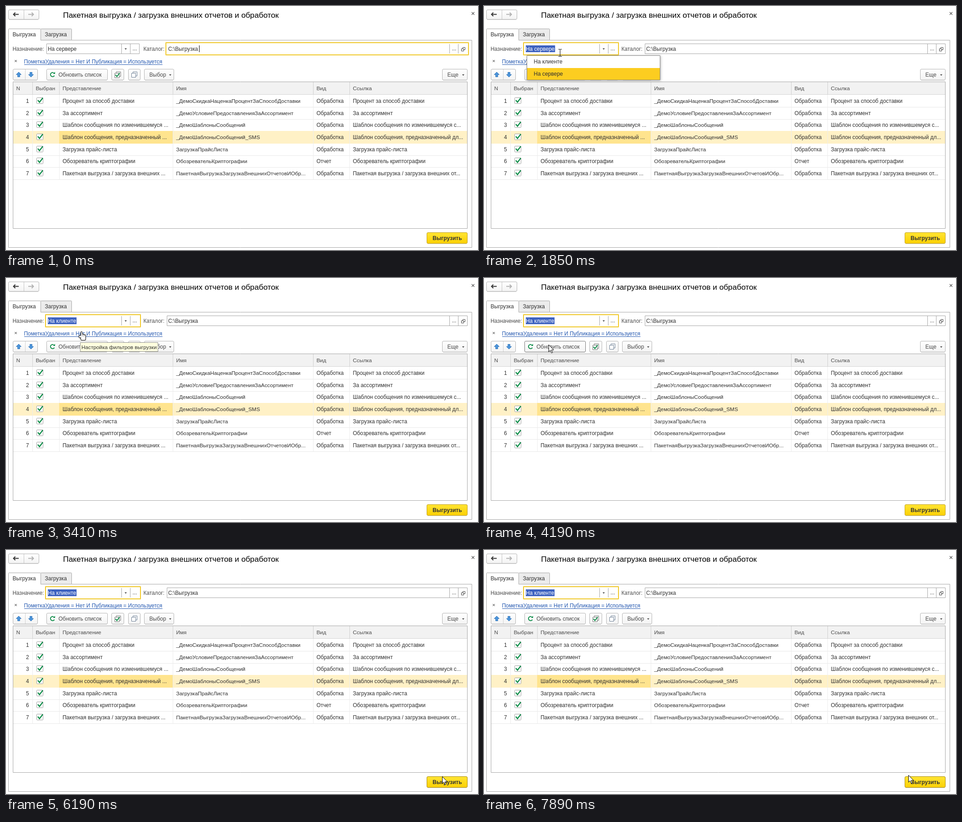
An HTML page with a canvas for the animation above (8 s loop, 1039 px wide and 539 px high).

```html
<!DOCTYPE html>
<html lang="ru">
<head>
<meta charset="utf-8">
<style>
html, body { margin: 0; width: 100%; height: 100%; overflow: hidden; background: #fff; }
canvas { display: block; }
</style>
</head>
<body>
<canvas id="stage" width="1039" height="539"></canvas>
<script>
const c = document.getElementById('stage').getContext('2d');
const LOOP = 8000;
const FONT = '"Liberation Sans", Arial, sans-serif';
const GOLD = '#f0c828', EDGE = '#a6a6a6', INK = '#303030', GRAY = '#4a4a4a', GREEN = '#0d8c48';
const HEAD = 167, BODY = 196, PITCH = 26.67;

const COLUMNS = [['N', 23], ['Выбран', 66], ['Представление', 125], ['Имя', 375], ['Вид', 684], ['Ссылка', 764]];
const ROWS = [
  ['Процент за способ доставки', '_ДемоСкидкаНаценкаПроцентЗаСпособДоставки'],
  ['За ассортимент', '_ДемоУсловиеПредоставленияЗаАссортимент'],
  ['Шаблон сообщения по изменившемуся ...', '_ДемоШаблоныСообщений', 'Шаблон сообщения по изменившемуся с...'],
  ['Шаблон сообщения, предназначенный ...', '_ДемоШаблоныСообщений_SMS', 'Шаблон сообщения, предназначенный дл...'],
  ['Загрузка прайс-листа', 'ЗагрузкаПрайсЛиста'],
  ['Обозреватель криптографии', 'ОбозревательКриптографии'],
  ['Пакетная выгрузка / загрузка внешних ...', 'ПакетнаяВыгрузкаЗагрузкаВнешнихОтчетовИОбр...', 'Пакетная выгрузка / загрузка внешних от...']
];

const TRIPS = [
  { start: 690, end: 1460, steps: 11, to: [163, 109], ease: [3.85, 2.02] },
  { start: 1540, end: 1930, steps: 6, to: [167, 103] },
  { start: 2230, end: 2400, steps: 3, to: [164, 117] },
  { start: 3640, end: 3870, steps: 4, to: [143, 146] },
  { start: 4190, end: 4490, steps: 5, to: [141, 150] },
  { start: 5580, end: 6040, steps: 7, to: [931, 503] },
  { start: 6190, end: 6190, steps: 1, to: [960, 500] },
  { start: 6270, end: 6970, steps: 10, to: [1013, 484], bulge: [-756, -313] },
  { start: 7050, end: 7130, steps: 2, to: [1000, 503] },
  { start: 7280, end: 7890, steps: 9, to: [934, 497] }
];
TRIPS.forEach((trip, i) => trip.from = i ? TRIPS[i - 1].to : [1182, 606]);

function text(s, x, y, size = 11.85, color = INK, weight = '', align = 'left') {
  c.font = `${weight} ${size}px ${FONT}`;
  c.fillStyle = color;
  c.textAlign = align;
  c.fillText(s, x - .5, y);
}

function rect(x, y, w, h, color) {
  c.fillStyle = color;
  c.fillRect(x, y, w, h);
}

function box(x, y, w, h, fill, stroke, r = 0) {
  c.beginPath();
  c.roundRect(x + .5, y + .5, w - 1, h - 1, r);
  c.fillStyle = fill;
  c.fill();
  c.strokeStyle = stroke;
  c.lineWidth = 1;
  c.stroke();
}

function line(points, color, width = 1) {
  c.beginPath();
  points.forEach(p => c.lineTo(...p));
  c.strokeStyle = color;
  c.lineWidth = width;
  c.stroke();
}

function shape(points, fill, stroke) {
  c.beginPath();
  points.forEach(p => c.lineTo(...p));
  c.closePath();
  c.fillStyle = fill;
  c.fill();
  if (stroke) {
    c.strokeStyle = stroke;
    c.lineWidth = 1;
    c.stroke();
  }
}

function at(x, y, paint, turn = 0) {
  c.save();
  c.translate(x, y);
  c.rotate(turn);
  paint();
  c.restore();
}

function button(x, y, w, h, edge = '#b3b3b3', top = '#fff', bottom = '#f3f3f3') {
  const g = c.createLinearGradient(0, y, 0, y + h);
  g.addColorStop(0, top);
  g.addColorStop(1, bottom);
  rect(x + 2, y + h, w - 4, 1, '#e2e2e2');
  box(x, y, w, h, g, edge, 2.5);
}

function input(x, w, focused) {
  if (focused) {
    box(x - 3, 80, w + 6, 29, '#fff', GOLD);
    box(x - 2, 81, w + 4, 27, '#fff', GOLD);
  } else {
    box(x, 83, w, 23, '#fff', EDGE);
  }
  for (const dx of [39, 20]) rect(x + w - dx - 1, 84, 1, 21, EDGE);
}

const triangle = (x, y) => shape([[x - 2.5, y - 1.5], [x + 2.5, y - 1.5], [x, y + 1.5]], '#444');

function cross(x, y, r, color) {
  for (const d of [-r, r]) line([[x - r, y - d], [x + r, y + d]], color, 1.1);
}

function navArrow(x, color, turn) {
  at(x, 18.5, () => {
    line([[-5, 0], [6, 0]], color, 2);
    line([[-1.5, -4], [-5.5, 0], [-1.5, 4]], color, 2);
  }, turn);
}

function blueArrow(x, turn) {
  at(x, 151.5, () => shape([[0, -5.5], [5.5, 0], [2.3, 0], [2.3, 5], [-2.3, 5], [-2.3, 0], [-5.5, 0]],
    '#4d96dc', '#2f73b8'), turn);
}

function check(x, y, s = 1) {
  line([[x, y], [x + 3.7 * s, y + 4.5 * s], [x + 11 * s, y - 5 * s]], GREEN, 2.4 * s);
}

function sheets(x, y, size, edge) {
  box(x + 3, y, size, size, '#fff', edge);
  box(x, y + 3, size, size, '#fff', edge);
}

function drawWindow() {
  rect(0, 0, 1039, 539, '#fff');
  button(5, 8, 68, 22);
  rect(39, 9, 1, 20, '#c4c4c4');
  navArrow(22, '#333', 0);
  navArrow(55, '#b0b0b0', Math.PI);
  text('Пакетная выгрузка / загрузка внешних отчетов и обработок', 126, 26, 17.23, '#000');
  cross(1028, 16.5, 3, '#555');

  box(5, 75, 1021, 459, '#fff', EDGE);
  box(76, 50, 69, 26, '#ececec', EDGE, 1);
  box(5, 50, 72, 26, '#fff', EDGE, 1);
  rect(6, 74, 70, 3, '#fff');
  text('Выгрузка', 15, 66.5, 12);
  text('Загрузка', 86, 66.5, 12);
}

function drawFields(value, moved, selected) {
  text('Назначение:', 15, 99, 11.85, GRAY);
  input(89, 205, moved);
  triangle(263.5, 95);
  text('...', 279, 98);
  if (selected) rect(92, 87, c.measureText(value).width + 1, 15, '#3d62c0');
  text(value, 92.5, 99, 11.85, selected ? '#fff' : INK);

  text('Каталог:', 303, 99, 11.85, GRAY);
  input(354, 662, !moved);
  text('C:\\Выгрузка', 357.5, 99);
  if (!moved) rect(425, 87, 1, 15, '#000');
  text('...', 982, 98);
  sheets(1002, 91, 6, '#444');

  const link = 'ПометкаУдаления = Нет И Публикация = Используется';
  cross(21.5, 121.5, 2.2, '#666');
  text(link, 40, 127, 11.88, '#2458b0');
  rect(40, 129, c.measureText(link).width, 1, '#2458b0');
}

function drawToolbar(hot) {
  button(15, 139, 55, 25);
  rect(42, 140, 1, 23, '#d0d0d0');
  blueArrow(28, 0);
  blueArrow(55, Math.PI);

  button(89, 139, 135, 25, hot ? '#777' : undefined);
  c.beginPath();
  c.arc(102.5, 151.5, 4.5, .5, 5.3);
  c.strokeStyle = GREEN;
  c.lineWidth = 2;
  c.stroke();
  shape([[103.5, 150], [108, 150], [108, 145.5]], GREEN);
  text('Обновить список', 116, 156, 12, GRAY);

  button(232, 139, 28, 25);
  sheets(239, 145, 11, '#777');
  check(241, 152, .85);
  button(269, 139, 27, 25);
  sheets(276, 145, 10, '#6d7f95');
  button(304, 139, 66, 25);
  text('Выбор', 316, 156, 12, GRAY);
  triangle(361.5, 152.5);
  button(960, 139, 56, 25);
  text('Еще', 972, 156, 12, GRAY);
  triangle(1006.5, 152.5);
}

function drawTable() {
  const rowTop = i => Math.floor(BODY + .8 + i * PITCH);
  box(15, HEAD, 1001, 325, '#fff', EDGE);
  rect(16, HEAD + 1, 999, 28, '#f2f2f2');
  rect(16, BODY - 1, 999, 1, '#d4d4d4');
  ROWS.forEach((_, i) => rect(16, rowTop(i + 1), 999, 1, '#e8e8e8'));
  rect(16, rowTop(3), 999, 28, '#fff1c6');
  COLUMNS.forEach(([name, x], i) => {
    text(name, x, 185.5, 11.8, GRAY);
    if (!i) return;
    rect(x - 8, HEAD + 1, 1, 28, '#d0d0d0');
    rect(x - 8, BODY, 1, 187, '#ececec');
  });
  rect(117, rowTop(3), 250, 28, '#ffe48e');

  const [, , titleX, nameX, kindX, refX] = COLUMNS.map(col => col[1]);
  ROWS.forEach(([title, name, ref = title], i) => {
    const y = Math.round(214 + i * PITCH);
    text(i + 1, 51, y, 11.85, INK, '', 'right');
    box(67, y - 12, 15, 14, '#fff', '#a0a0a0', 1);
    check(70, y - 6);
    text(title, titleX, y, 11.98);
    text(name, nameX, y, 11.82);
    text(i === 5 ? 'Отчет' : 'Обработка', kindX, y);
    text(ref, refX, y, 11.95);
  });
}

function drawSubmit(hot, pressed) {
  const [top, bottom] = pressed ? ['#f0c800', '#e8c000'] : ['#ffe535', '#fbd000'];
  button(926, 500, 90, 25, hot ? '#a88a10' : '#c0a020', top, bottom);
  text('Выгрузить', 939.5, 517, 12.1, '#333', 'bold');
}

function drawMenu(active) {
  c.save();
  c.shadowColor = 'rgba(0,0,0,.3)';
  c.shadowBlur = 5;
  c.shadowOffsetX = c.shadowOffsetY = 1;
  rect(94, 109, 294, 55, '#fff');
  c.restore();
  box(94, 109, 294, 55, '#fff', '#858585');
  ['На клиенте', 'На сервере'].forEach((item, i) => {
    if (i === active) rect(95, 110 + 27 * i, 292, 26, '#fccd20');
    text(item, 110, 127 + 27 * i, 12);
  });
}

function drawTip() {
  box(163, 142, 172, 21, '#ffffdf', '#8c8c8c');
  text('Настройка фильтров выгрузки', 166.5, 156.5, 11.75);
}

function drawArrow() {
  shape([[.5, .5], [.5, 16], [4, 12.7], [6.5, 18.5], [9, 17.5], [6.5, 12], [11.5, 12]], '#fff', '#000');
}

function drawBeam() {
  rect(0, -7, 1, 15, '#000');
  for (const y of [-8, 8]) {
    rect(-3, y, 3, 1, '#000');
    rect(1, y, 3, 1, '#000');
  }
}

function drawHand() {
  c.beginPath();
  for (let i = 0; i < 4; i++) c.roundRect(2 + 2.6 * i, i ? 5 + i : 1, 2.2, 12 - i, 1);
  c.roundRect(2, 11, 10, 8, 2);
  c.roundRect(-2, 9, 4, 5, 2);
  c.strokeStyle = '#000';
  c.lineWidth = 2;
  c.stroke();
  c.fillStyle = '#fff';
  c.fill();
}

function pointerAt(t) {
  const trip = TRIPS.filter(m => m.start <= t).pop();
  if (!trip) return null;
  const { start, end, steps, from, to, ease = [1.5, 1.5], bulge = [0, 0] } = trip;
  const gap = (end - start) / (steps - 1) || 1;
  const u = Math.min(steps, Math.floor((t - start) / gap + 1.1)) / steps;
  return [0, 1].map(a => Math.round(
    to[a] + (from[a] - to[a]) * (1 - u) ** ease[a] + bulge[a] * Math.sin(Math.PI * u)));
}

function drawPointer(t, [x, y]) {
  const during = (a, b) => t >= a && t < b;
  if (during(2630, 2860)) return;
  if (during(2860, 3710)) at(x - 1, y + 1, drawHand);
  else if (during(1540, 2300)) at(x, y, drawBeam);
  else at(x, y, drawArrow);
}

function draw(t) {
  const p = pointerAt(t);
  const during = (a, b) => t >= a && t < b;
  const over = (x, y, w, h) => p && p[0] >= x && p[0] < x + w && p[1] >= y && p[1] < y + h;
  const moved = t >= 1620;
  const busy = during(4270, 4410) || during(7440, 7660);
  drawWindow();
  drawFields(t < 2860 ? 'На сервере' : 'На клиенте', moved, moved && !busy);
  drawToolbar(t > 3700 && over(89, 139, 135, 25));
  drawTable();
  drawSubmit(over(926, 497, 90, 28), during(7360, 7510));
  if (during(1780, 2860)) drawMenu(t < 2315 ? 1 : 0);
  if (during(3410, 3640)) drawTip();
  if (p) drawPointer(t, p);
}

function loop() {
  draw(performance.now() % LOOP);
  requestAnimationFrame(loop);
}
loop();
</script>
</body>
</html>
```
